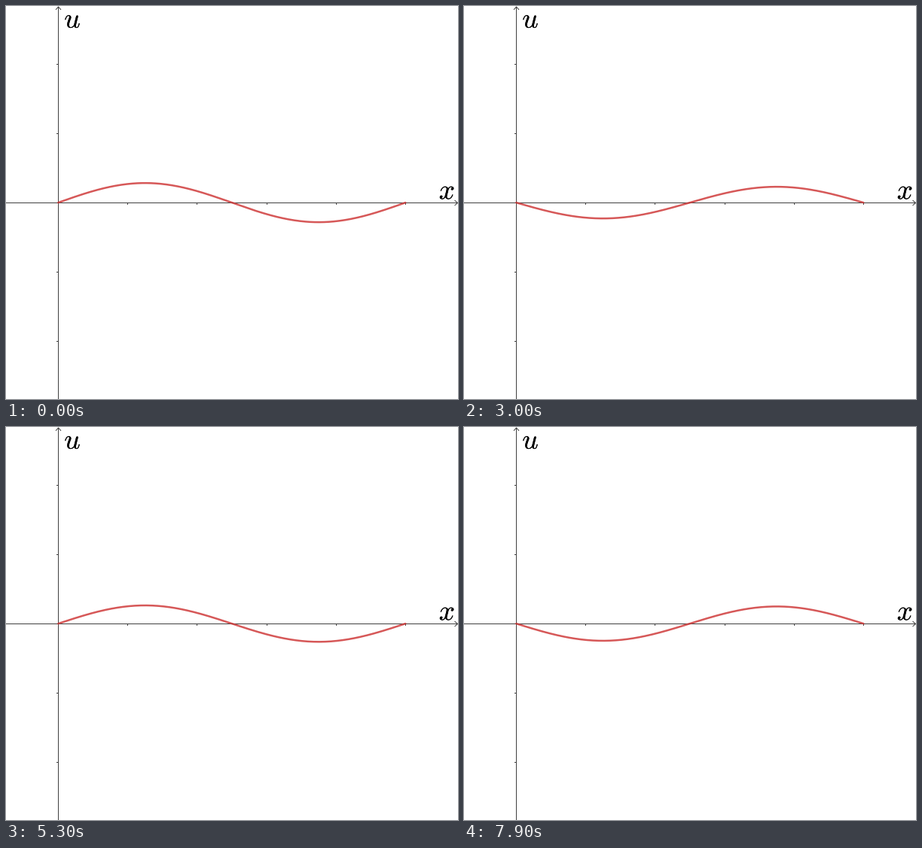
A matplotlib script for the animation above (8000 ms loop, 600 by 522 pixels).

```python
import matplotlib.pyplot as plt
import numpy as np
from matplotlib import patheffects
from matplotlib.animation import FuncAnimation

W, H = 600, 522
FRAMES, STEP = 80, 100      # frame count, ms per frame
PERIOD = 5000               # ms per oscillation
X0, Y0 = 69.5, 261.5        # axis crossing, at a pixel centre
UNIT = 92.2                 # tick spacing in pixels
LENGTH = 5 * UNIT
AMPLITUDE = 26
WAVE_X, WAVE_Y = 69.3, 261.15
AXIS_COLOR = "#404040"
WAVE_COLOR = "#cc2e2e"

# At 72 dpi one point equals one pixel.
fig = plt.figure(figsize=(W / 72, H / 72), dpi=72, facecolor="white")
ax = fig.add_axes([0, 0, 1, 1])
ax.set_xlim(0, W)
ax.set_ylim(H, 0)
ax.axis("off")


def stroke(xs, ys):
    ax.plot(xs, ys, color=AXIS_COLOR, lw=1, zorder=1, snap=False,
            solid_capstyle="butt", solid_joinstyle="miter")


def pixel_center(v):
    return np.floor(v) + 0.5


def label(x, y, letter):
    """Math italic, emboldened sideways by overlapping copies."""
    bold = [patheffects.Normal(offset=(dx, 0)) for dx in (-0.6, 0.6)]
    ax.text(x, y, f"${letter}$", fontsize=37.5, math_fontfamily="cm",
            color="black", ha="center", va="baseline", path_effects=bold)


# Axes with open arrowheads
stroke([0, W - 0.5], [Y0, Y0])
stroke([X0, X0], [1, H])
stroke([W - 4.5, W - 0.5, W - 4.5], [Y0 - 3.5, Y0, Y0 + 3.5])
stroke([X0 - 3.5, X0, X0 + 3.5], [5, 1, 5])

# Ticks
for k in range(1, 6):
    x = pixel_center(X0 + k * UNIT)
    stroke([x, x], [Y0, Y0 + 2.5])
for k in (-2, -1, 1, 2):
    y = pixel_center(Y0 + k * UNIT)
    stroke([X0 - 2.5, X0], [y, y])

label(88.5, 29, "u")
label(585.5, 256.5, "x")

s = np.linspace(0, 1, 300)
shape = np.sin(2 * np.pi * s)
wave, = ax.plot(WAVE_X + LENGTH * s, WAVE_Y + 0 * s, color=WAVE_COLOR,
                alpha=0.8, lw=2.5, zorder=2, snap=False,
                solid_capstyle="round")


def update(i):
    swing = AMPLITUDE * np.cos(2 * np.pi * i * STEP / PERIOD)
    wave.set_ydata(WAVE_Y - swing * shape)
    return wave,


anim = FuncAnimation(fig, update, frames=FRAMES, interval=STEP,
                     repeat=True, repeat_delay=0)
plt.show()
```
